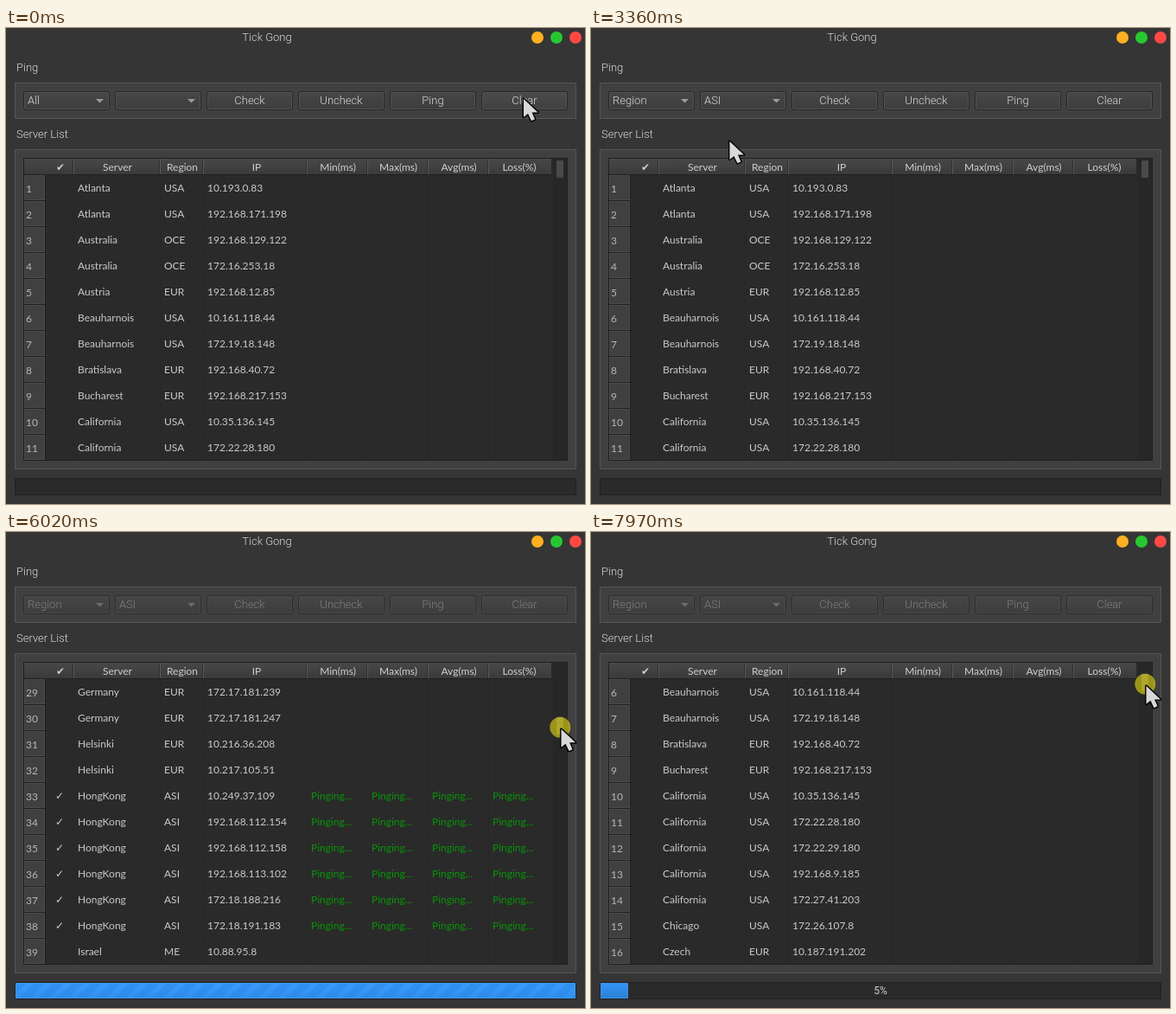
Recreate the animation shown at these times as an HTML page with a canvas. Size 670 by 550 pixels, loop 8000 ms.

```html
<!DOCTYPE html>
<html lang="en">
<head>
<meta charset="utf-8">
<title>Tick Gong</title>
<style>
html, body { margin: 0; width: 100%; height: 100%; overflow: hidden; background: #353535; }
canvas { display: block; }
</style>
</head>
<body>
<canvas id="stage" width="670" height="550"></canvas>
<script>
const ctx = document.getElementById('stage').getContext('2d');
const LOOP = 8000;
const TABLE_FONT = '12px Lato, sans-serif';
const UI_FONT = '300 13px Roboto, sans-serif';
const MENU_FONT = '12px Roboto, sans-serif';
const MARK_FONT = '12px "DejaVu Sans", sans-serif';

// Moments at which the interface changes state
const MODE_OPEN = 700, MODE_PICK = 1520, REGION_OPEN = 2250, REGION_PICK = 3110;
const CHECKED = 3900, STARTED = 4400, DRAG = 5440, FIRST_RESULT = 7945;

const MODES = ['All', 'Server', 'Region'];
const REGIONS = ['USA', 'OCE', 'EUR', 'RUS', 'ASI', 'ME', 'AF', 'SAM'];
const BUTTONS = ['Check', 'Uncheck', 'Ping', 'Clear'];
const HEADERS = [['Server', 129], ['Region', 204], ['IP', 290], ['Min(ms)', 384],
  ['Max(ms)', 454], ['Avg(ms)', 524], ['Loss(%)', 594]];
const DIVIDERS = [78, 178, 228, 348, 418, 488, 558];

const SERVERS = `Atlanta USA 10.193.0.83 192.168.171.198
Australia OCE 192.168.129.122 172.16.253.18
Austria EUR 192.168.12.85
Beauharnois USA 10.161.118.44 172.19.18.148
Bratislava EUR 192.168.40.72
Bucharest EUR 192.168.217.153
California USA 10.35.136.145 172.22.28.180 172.22.29.180 192.168.9.185 172.27.41.203
Chicago USA 172.26.107.8
Czech EUR 10.187.191.202 192.168.38.51
Dallas USA 192.168.25.143 192.168.25.146
Denver USA 10.17.63.82
Ekaterinburg RUS 10.223.91.8 10.223.91.17
Finland EUR 10.216.45.81 10.216.45.93
France EUR 10.204.161.26 10.204.186.230 192.168.3.186 192.168.28.234
Germany EUR 172.17.181.239 172.17.181.247
Helsinki EUR 10.216.36.208 10.217.105.51
HongKong ASI 10.249.37.109 192.168.112.154 192.168.112.158 192.168.113.102 172.18.188.216 172.18.191.183
Israel ME 10.88.95.8`.split('\n').flatMap(line => {
  const [name, region, ...hosts] = line.split(' ');
  return hosts.map(ip => ({ name, region, ip }));
});

// Keys are [time, ...values]
const POINTER = [[100, 599, 82], [240, 390, 244], [410, 62, 84], [640, 62, 84], [740, 62, 86],
  [1130, 66, 130], [1530, 66, 130], [1850, 415, 215], [2130, 415, 215], [2250, 164, 86],
  [2300, 164, 86], [2670, 176, 164], [3120, 176, 164], [3390, 160, 130], [3610, 160, 130],
  [3670, 285, 83], [3920, 285, 83], [4250, 496, 84], [4680, 496, 84], [5400, 642, 167]];
const SCROLL = [[DRAG, 0], [5570, 11], [6020, 28], [6500, 1.4], [7000, 28], [7370, 23],
  [7750, 1.8], [7940, 5], [LOOP, 5]];

function track(keys, t) {
  const next = keys.findIndex(key => key[0] > t);
  if (next === 0) return keys[0].slice(1);
  if (next < 0) return keys[keys.length - 1].slice(1);
  const a = keys[next - 1], b = keys[next];
  const k = (1 - Math.cos(Math.PI * (t - a[0]) / (b[0] - a[0]))) / 2;
  return a.slice(1).map((v, i) => v + (b[i + 1] - v) * k);
}

function fill(x, y, w, h, color) {
  ctx.fillStyle = color;
  ctx.fillRect(x, y, w, h);
}

function frame(x, y, w, h, color, radius = 0) {
  ctx.strokeStyle = color;
  ctx.lineWidth = 1;
  ctx.beginPath();
  ctx.roundRect(x + .5, y + .5, w - 1, h - 1, radius);
  ctx.stroke();
}

function disc(x, y, r, color) {
  ctx.fillStyle = color;
  ctx.beginPath();
  ctx.arc(x, y, r, 0, Math.PI * 2);
  ctx.fill();
}

function text(str, x, y, font, color, align = 'left') {
  ctx.font = font;
  ctx.fillStyle = color;
  ctx.textAlign = align;
  ctx.fillText(str, x, y);
}

function shade(y, h, top, bottom) {
  const gradient = ctx.createLinearGradient(0, y, 0, y + h);
  gradient.addColorStop(0, top);
  gradient.addColorStop(1, bottom);
  return gradient;
}

function drawButton(x, disabled, hover) {
  fill(x + 1, 74, 98, 20, hover ? shade(74, 20, '#4b4b4b', '#414141') : shade(74, 20, '#474747', '#3d3d3d'));
  frame(x + 1, 74, 98, 20, disabled ? '#484848' : '#525252', 1);
  frame(x, 73, 100, 22, disabled ? '#2e2e2e' : '#272727', 2);
}

function drawCombo(x, label, disabled, hover) {
  drawButton(x, disabled, hover);
  text(label, x + 5, 88, UI_FONT, disabled ? '#7f7f7f' : '#d8d8d8');
  ctx.fillStyle = disabled ? '#6c6c6c' : '#9a9a9a';
  ctx.beginPath();
  ctx.moveTo(x + 84, 82);
  ctx.lineTo(x + 93, 82);
  ctx.lineTo(x + 88.5, 86.5);
  ctx.fill();
}

function drawToolbar(t, pointer) {
  const disabled = t >= STARTED;
  const hover = x => !disabled && pointer[1] > 73 && pointer[1] < 95
    && pointer[0] > x && pointer[0] < x + 100;
  const region = t < MODE_PICK ? '' : t < REGION_PICK ? 'USA' : 'ASI';
  drawCombo(20, t < MODE_PICK ? 'All' : 'Region', disabled, hover(20));
  drawCombo(126, region, disabled, hover(126));
  BUTTONS.forEach((label, i) => {
    const x = 232 + 106 * i;
    drawButton(x, disabled, hover(x));
    text(label, x + 50, 88, UI_FONT, disabled ? '#7f7f7f' : '#d8d8d8', 'center');
  });
}

function drawMenu(x, items, pointerY) {
  const height = items.length * 20 + 2;
  const active = Math.max(0, Math.min(items.length - 1, Math.floor((pointerY - 74) / 20)));
  fill(x + 3, 76, 100, height, 'rgba(0,0,0,.4)');
  fill(x, 73, 100, height, '#333');
  fill(x + 1, 74 + 20 * active, 98, 20, '#2a82da');
  frame(x, 73, 100, height, '#191919');
  items.forEach((item, i) =>
    text(item, x + 8, 89 + 20 * i, MENU_FONT, i === active ? '#d2d2d2' : '#bebebe'));
}

function drawTable(t, scroll) {
  const first = Math.round(scroll);
  fill(20, 150, 630, 350, '#2a2a2a');
  for (const x of DIVIDERS) fill(x, 170, 1, 329, '#272727');
  fill(21, 151, 610, 18, shade(151, 18, '#484848', '#3a3a3a'));
  fill(21, 169, 610, 1, '#202020');
  for (const x of DIVIDERS) {
    fill(x, 152, 1, 17, '#585858');
    fill(x - 1, 152, 1, 17, '#303030');
  }
  text('✔', 63, 165, MARK_FONT, '#d0d0d0', 'center');
  for (const [label, x] of HEADERS) text(label, x, 165, TABLE_FONT, '#cfcfcf', 'center');

  for (let i = 0; i < 11; i++) {
    const row = SERVERS[first + i], y = 170 + 30 * i, base = y + 19;
    fill(21, y, 24, 29, '#404040');
    frame(21, y, 24, 29, '#4a4a4a');
    fill(21, y + 29, 25, 1, '#202020');
    fill(45, y, 1, 30, '#202020');
    text(first + i + 1, 23, base + 1, TABLE_FONT, '#b6b6b6');
    if (first + i === 0 && t >= STARTED) {
      fill(46, y, 33, 29, '#29323c');
      frame(46, y, 33, 29, '#2e4661');
      fill(55, y + 7, 14, 14, '#242628');
    }
    text(row.name, 83, base, TABLE_FONT, '#cacaca');
    text(row.region, 183, base, TABLE_FONT, '#cacaca');
    text(row.ip, 233, base, TABLE_FONT, '#cacaca');
    if (row.region !== 'ASI' || t < CHECKED) continue;
    text('✓', 62, base, MARK_FONT, '#d0d0d0', 'center');
    if (t < STARTED) continue;
    for (let col = 0; col < 4; col++)
      text('Pinging...', 353 + 70 * col, base, TABLE_FONT, '#079607');
  }

  fill(633, 151, 16, 348, '#272727');
  ctx.fillStyle = t >= DRAG ? '#646464' : '#4a4a4a';
  ctx.beginPath();
  ctx.roundRect(637, 153 + 2.17 * scroll, 8, 20, 1);
  ctx.fill();
  frame(20, 150, 630, 350, '#202020');
}

function drawProgress(t) {
  fill(10, 520, 650, 20, '#2a2a2a');
  frame(10, 520, 650, 20, '#212121', 2);
  if (t < STARTED) return;
  const busy = t < FIRST_RESULT;
  const width = busy ? 648 : 32;
  fill(11, 521, width, 18, shade(521, 18, '#3a9bfd', '#318ff2'));
  if (busy) {
    ctx.save();
    ctx.beginPath();
    ctx.rect(11, 521, width, 18);
    ctx.clip();
    ctx.strokeStyle = 'rgba(42,130,218,.4)';
    ctx.lineWidth = 9;
    ctx.beginPath();
    for (let x = -34 + (t * .06) % 22; x < 670; x += 22) {
      ctx.moveTo(x, 541);
      ctx.lineTo(x + 22, 519);
    }
    ctx.stroke();
    ctx.restore();
  } else {
    fill(11, 521, width, 18, shade(521, 18, '#3596f7', '#2a7fd4'));
    text('5%', 335, 534, MENU_FONT, '#d0d0d0', 'center');
  }
  frame(11, 521, width, 18, busy ? '#3b9cfb' : '#3a92ea');
}

function drawPointer(x, y) {
  const arrow = new Path2D('M0 0V21L5 17 9 25.3 13 23.5 9.6 15.6H16.5Z');
  ctx.save();
  ctx.translate(x, y);
  ctx.lineJoin = 'round';
  ctx.strokeStyle = '#000';
  ctx.lineWidth = 2.8;
  ctx.stroke(arrow);
  ctx.fillStyle = '#d8d8d8';
  ctx.fill(arrow);
  ctx.restore();
}

function drawWindow() {
  fill(0, 0, 670, 550, '#353535');
  text('Tick Gong', 302, 15, UI_FONT, '#d8d8d8', 'center');
  disc(615, 11, 7, '#ffb020');
  disc(637, 11, 7, '#28c732');
  disc(659, 11, 7, '#ff4946');
  text('Ping', 12, 50, UI_FONT, '#d8d8d8');
  text('Server List', 12, 127, UI_FONT, '#d8d8d8');
  for (const [y, h] of [[63, 42], [140, 370]]) {
    fill(10, y, 650, h, '#404040');
    frame(10, y, 650, h, '#565656');
  }
}

function draw(t) {
  const [scroll] = track(SCROLL, t);
  const dragging = t >= DRAG;
  const pointer = dragging ? [642.5, 167 + 2.17 * scroll] : track(POINTER, t);
  drawWindow();
  drawToolbar(t, pointer);
  drawTable(t, scroll);
  drawProgress(t);
  if (t >= MODE_OPEN && t < MODE_PICK) drawMenu(20, MODES, pointer[1]);
  if (t >= REGION_OPEN && t < REGION_PICK) drawMenu(126, REGIONS, pointer[1]);
  if (dragging) disc(641.3, pointer[1] - 2, 12, 'rgba(205,195,20,.7)');
  drawPointer(...pointer);
}

function tick() {
  draw(performance.now() % LOOP);
  requestAnimationFrame(tick);
}
tick();
</script>
</body>
</html>
```
